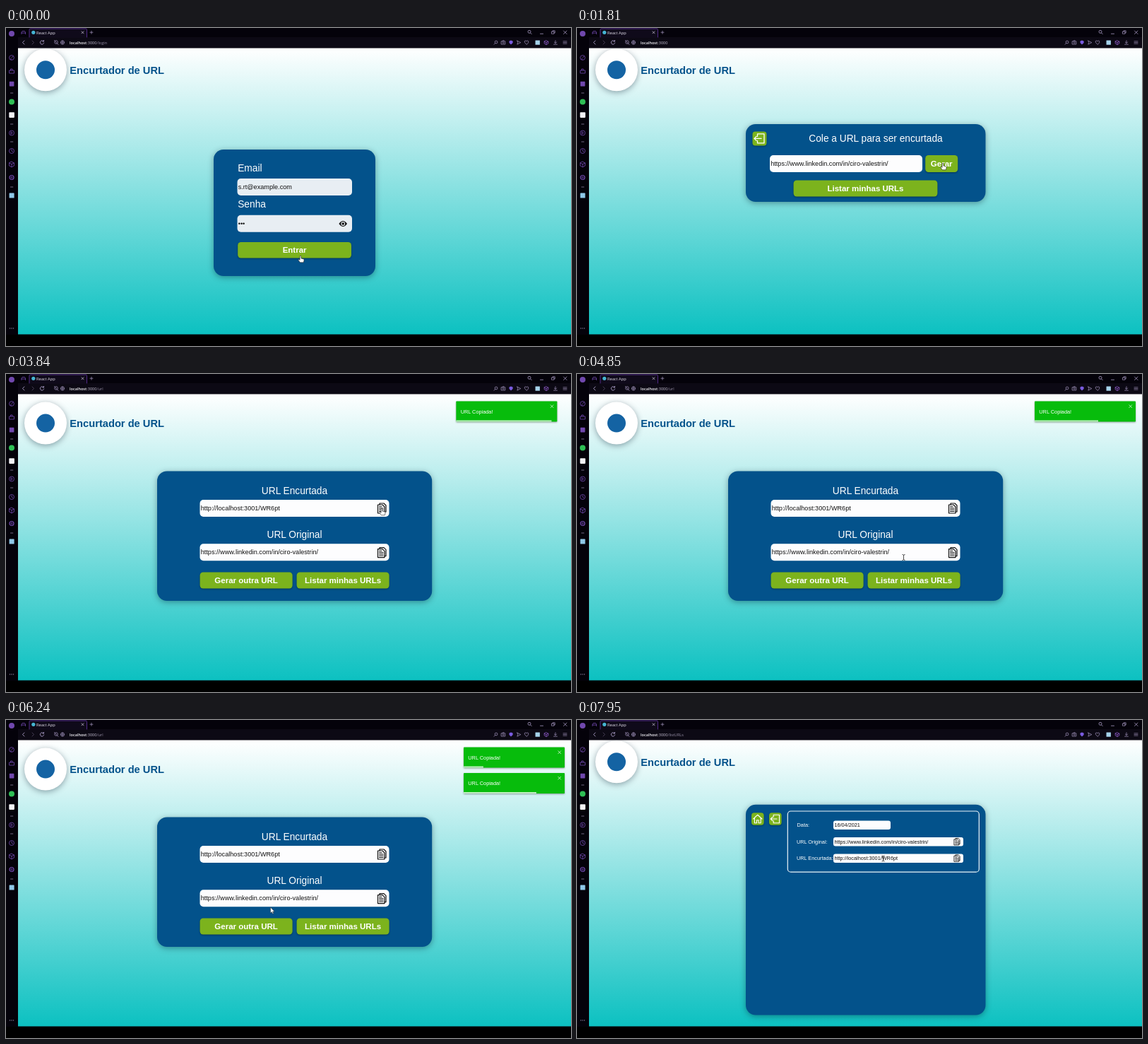
These frames come from a looping animation (800 by 450 pixels, 8000 ms). An HTML page:

```html
<!DOCTYPE html>
<html lang="pt-BR">
<head>
<meta charset="utf-8">
<title>Encurtador de URL</title>
<style>
  html, body { margin: 0; width: 100%; height: 100%; overflow: hidden; background: #000; }
  svg { display: block; width: 100vw; height: 100vh; }
  text { font-family: "Liberation Sans", Arial, sans-serif; white-space: pre; }
  .ui { font-family: "Open Sans", sans-serif; }
  .b { font-weight: bold; }
  .shadow { filter: drop-shadow(0 2px 4px rgba(0, 20, 40, .38)); }
  .lift { filter: drop-shadow(0 1px 1px rgba(0, 0, 0, .35)); }
  .line { fill: none; stroke-linecap: round; stroke-linejoin: round; }
</style>
</head>
<body>
<svg id="stage" viewBox="0 0 800 450"></svg>
<script>
const LOOP = 8000;
const BLUE = '#03528b', GREEN = '#7cb31d', PURPLE = '#7048ad', PALE = '#a99bc4';
const LONG_URL = 'https://www.linkedin.com/in/ciro-valestrin/';
const SHORT_URL = 'http://localhost:3001/WR6pt';

// Drawing helpers
const rect = (x, y, w, h, r, fill, extra = '') =>
  `<rect x="${x}" y="${y}" width="${w}" height="${h}" rx="${r}" fill="${fill}" ${extra}/>`;
const disc = (x, y, r, fill, extra = '') =>
  `<circle cx="${x}" cy="${y}" r="${r}" fill="${fill}" ${extra}/>`;
const ring = (x, y, r, color, w = .8) => disc(x, y, r, 'none', `stroke="${color}" stroke-width="${w}"`);
const line = (d, color, w = .8, extra = '') =>
  `<path class="line" d="${d}" stroke="${color}" stroke-width="${w}" ${extra}/>`;
const text = (x, y, size, fill, str, extra = '') =>
  `<text x="${x}" y="${y}" font-size="${size}" fill="${fill}" ${extra}>${str}</text>`;
const mid = 'text-anchor="middle"';
const group = (id, body) => `<g id="${id}">${body}</g>`;

const card = (x, y, w, h) => rect(x, y, w, h, 14, BLUE, 'class="shadow"');
const heading = (x, y, str) => text(x, y, 13.72, '#fff', str, mid);
const button = (x, y, w, h, str) =>
  rect(x, y, w, h, 4.5, GREEN, 'class="lift"') +
  text(x + w / 2, y + h / 2 + 4, 11.5, '#fff', str, `class="b" ${mid}`);
const field = (x, y, w, str, fill = '#fdfdfe') =>
  rect(x, y, w, 24, 5, fill) + text(x + 1.2, y + 14.8, 9.15, '#111', str);
const smallField = (y, w, str) =>
  rect(363, y, w, 12.5, 3, '#fdfdfe') + text(364.4, y + 8.8, 7.3, '#111', str);

const copyIcon = (x, y, s) => `<g transform="translate(${x} ${y}) scale(${s})">` +
  line('M-3 -5V-7H3L6 -4V5H4', '#111', 1.2) +
  line('M-5.5 -5H1L4 -2V7H-5.5Z', '#111', 1.2) +
  line('M-3.5 -2.2H0M-3.5 0H2M-3.5 2.2H2M-3.5 4.5H2', '#111', 1) + '</g>';
const iconBox = (x, y, s, d) =>
  rect(x - s / 2, y - s / 2, s, s, 4, GREEN, 'class="lift"') +
  `<g transform="translate(${x} ${y}) scale(${s / 20})">${line(d, '#fff', 1.3)}</g>`;
const EXIT = 'M-3 -3V-6.5H6.5V6.5H-3V3M2.5 0H-7.5M-4.5 -3L-7.5 0L-4.5 3';
const HOUSE = 'M-7 0L0 -6.5L7 0M-5 -1V6.5H-1.5V2H1.5V6.5H5V-1';

const sideBar = () =>
  disc(8, 8, 4, PURPLE) +
  ring(8, 42, 3.4, PURPLE) + line('M8 42L10 40M6 44H8', PURPLE) +
  line('M5 60H11.5V64H5ZM6.5 60V58H9V60', PURPLE) +
  rect(4.8, 75.8, 6.6, 6.6, .6, PURPLE) +
  disc(8, 104.5, 4, '#2fbf55') +
  rect(4.3, 119.3, 7.6, 7.6, .8, '#f2f2f5') +
  ring(8, 148.5, 3.5, PURPLE) + line('M7.2 147L9.4 148.5L7.2 150Z', PURPLE) +
  ring(8, 174, 3.5, PURPLE) + line('M8 172V174L9.6 175', PURPLE) +
  line('M8 189.2L11.4 191V195L8 196.8L4.6 195V191ZM4.6 191L8 192.8L11.4 191M8 192.8V196.8', PURPLE) +
  ring(8, 211.5, 3, PURPLE, 1.2) + ring(8, 211.5, 1.1, PURPLE) +
  rect(4.6, 233.6, 7, 7, .4, '#8fc9e8') +
  [92, 136, 161, 225].map(y => line(`M6.5 ${y}H9.8`, '#8c82a0', .8)).join('') +
  [5.5, 8, 10.5].map(x => disc(x, 425, .7, '#9187a6')).join('');

const topBar = () =>
  line('M22 8.5V6L23 4.5H26.5L27.5 6V8.5M22 7H27.5', PURPLE) +
  line('M33 13V2.5Q33 1 34.5 1H113Q114.5 1 114.5 2.5V13', '#5b2f96', .9) +
  disc(38.8, 6.3, 2.6, '#45b5d3') +
  text(43, 8.5, 5.7, '#e6e2ee', 'React App', 'class="ui"') +
  line('M107 4.8L110 7.8M110 4.8L107 7.8', '#d8d3e2', .7) +
  line('M119 6.2H123M121 4.2V8.2', PALE, .7) +
  ring(741, 5.3, 2, PALE) + line('M742.6 7L744.2 8.6', PALE) +
  line('M756.5 8.2H760.5', PALE) +
  line('M772.8 5H776V8.2H772.8ZM774 5V3.8H777.2V7H776', PALE, .7) +
  line('M789.5 4L794 8.5M794 4L789.5 8.5', PALE) +
  line('M26 18L23.4 20.5L26 23', PALE, .9) + line('M37 18L39.6 20.5L37 23', '#4d455c', .9) +
  line('M53 18.6A2.7 2.7 0 1 0 53.7 21M53.5 17.4V19H51.9', PALE, .9) +
  ring(71, 20, 2.3, PALE, .7) + line('M68.5 17.5L74 23.5', PALE, .7) +
  ring(80, 20.5, 2.6, PALE, .7) + line('M77.4 20.5H82.6M80 18Q78 20.5 80 23Q82 20.5 80 18', PALE, .5) +
  ring(694, 20, 1.9, PALE, .7) + line('M692.6 21.5L691 23.2', PALE, .7) +
  line('M701.5 18.8H706.8V23H701.5ZM703 18.8L703.5 17.8H705', PALE, .7) + ring(704.2, 20.8, 1, PALE, .6) +
  '<path d="M712.5 18.5L715 17.4L717.6 18.5V21L715 23.6L712.5 21Z" fill="#7a5ce0"/>' +
  line('M723.8 18L728.8 20.6L723.8 23.2L724.7 20.6Z', PALE, .7) +
  line('M737 23.2L734.3 20.4Q733.7 18 735.6 17.9Q736.6 18 737 19Q737.4 18 738.4 17.9Q740.3 18 739.7 20.4Z', PALE, .7) +
  rect(749.5, 17.4, 6.4, 6.4, .4, '#a5d2ea') +
  line('M765 17.8L767.8 19.2V22L765 23.5L762.2 22V19.2ZM762.2 19.2L765 20.6L767.8 19.2M765 20.6V23.5', '#9b62d8', .7) +
  line('M778 17.8V21.5M776.4 20L778 21.6L779.6 20M775.6 23.2H780.4', PALE, .7) +
  line('M789 18.8H794M789 20.5H794M789 22.2H794', PALE, .6);

const login =
  card(294, 172, 229, 179) +
  text(328.2, 203, 13.75, '#fff', 'Email') +
  field(327.5, 213, 162.5, 's.rt@example.com', '#e8eef3') +
  text(328.2, 254.2, 13.75, '#fff', 'Senha') +
  field(327.5, 264.8, 162.5, '•••', '#e8eef3') +
  '<path d="M471.4 277Q477.2 268.8 483 277Q477.2 285.2 471.4 277Z" fill="#111"/>' +
  disc(477.2, 277, 2.9, '#e8eef3') + disc(477.2, 277, 1.8, '#111') +
  button(328.2, 303, 160.8, 22.5, 'Entrar');

const home =
  card(239, 136, 339.5, 110) +
  iconBox(258.5, 156.4, 20, EXIT) +
  heading(423, 160.5, 'Cole a URL para ser encurtada') +
  field(273, 180, 216, '<tspan id="typed"></tspan>') +
  button(493.2, 180, 46, 24, 'Gerar') +
  button(306.6, 215.5, 203.8, 23, 'Listar minhas URLs');

const result =
  card(214, 137.5, 389.2, 183.5) +
  heading(408.5, 170, 'URL Encurtada') +
  field(274.5, 178, 268, SHORT_URL) + copyIcon(532, 190, 1) +
  heading(408.5, 232.3, 'URL Original') +
  field(274.5, 240.3, 268, LONG_URL) + copyIcon(532, 252.6, 1) +
  button(274.6, 280.5, 131, 23, 'Gerar outra URL') +
  button(411.6, 280.5, 131, 23, 'Listar minhas URLs');

const list =
  card(239, 119.8, 339.5, 297.7) +
  iconBox(255.8, 140, 17.6, HOUSE) + iconBox(280.8, 140, 17.6, EXIT) +
  group('row',
    rect(298.3, 129, 271, 86.2, 4.5, 'none', 'stroke="#eef4f8" stroke-width="1.2"') +
    text(311.6, 151.3, 7.3, '#fff', 'Data:') +
    text(311, 174.8, 7.3, '#fff', 'URL Original:') +
    text(311, 198.2, 7.3, '#fff', 'URL Encurtada:') +
    smallField(142.6, 81, '16/04/2021') +
    smallField(166, 184, LONG_URL) + copyIcon(538, 172.2, .68) +
    smallField(189.4, 184, SHORT_URL) + copyIcon(538, 195.6, .68));

const toast = (id, y) => group(id,
  rect(648, y, 143, 29, .8, '#07bc0c', 'class="lift"') +
  text(654.3, y + 17, 7.35, '#fff', 'URL Copiada!') +
  line(`M781.8 ${y + 5.3}L785.6 ${y + 9.1}M785.6 ${y + 5.3}L781.8 ${y + 9.1}`, '#d6f5d7', .8) +
  rect(648, y + 27, 143, 2, 0, '#fff', 'class="bar" opacity=".75"'));

const cursors =
  group('arrow', '<path d="M0 0V8.2L1.9 6.5L3.1 9.2L4.4 8.6L3.2 6H5.7Z" fill="#fff" stroke="#222" stroke-width=".5"/>') +
  group('beam', line('M-1.6 -4Q0 -4 0 -3V3Q0 4 -1.6 4M1.6 -4Q0 -4 0 -3M0 3Q0 4 1.6 4', '#222', .8)) +
  group('hand', '<path d="M-.9 .8Q0 -.5 .9 .8V4L4.6 5Q5.3 5.4 5 7L4.3 9.8H-.6L-3 6.6Q-3.2 5.2 -1.8 5.6L-.9 6.4Z" fill="#fff" stroke="#222" stroke-width=".6"/>');

const stage = document.getElementById('stage');
stage.innerHTML =
  `<defs><linearGradient id="sky" x2="0" y2="1"><stop stop-color="#fff"/><stop offset="1" stop-color="#0cc1c1"/></linearGradient></defs>` +
  rect(0, 0, 800, 450, 0, '#000') + rect(0, 0, 800, 434, 0, '#04020a') +
  rect(17, 13, 783, 15.5, 0, '#0c0914') + rect(33, 1, 81.5, 13, 1.5, '#0f0a1a') +
  rect(17, 28.5, 783, 405, 0, 'url(#sky)') + sideBar() + topBar() +
  text(90, 22.7, 5.55, '#f4f2f8', '<tspan font-weight="600">localhost</tspan><tspan fill="#c5bfd2">:3000</tspan><tspan id="path" fill="#9a92aa"></tspan>', 'class="ui"') +
  group('header',
    disc(56, 59.3, 30, '#fff', 'class="shadow"') + disc(56, 59.3, 13, '#1463a3') +
    text(90.3, 64.7, 14.68, BLUE, 'Encurtador de URL', 'class="b"')) +
  group('login', login) + group('home', home) + group('result', result) + group('list', list) +
  toast('toast1', 38.5) + toast('toast2', 75) + group('cursor', cursors);

const $ = id => document.getElementById(id);
const show = (id, on) => $(id).setAttribute('display', on ? 'inline' : 'none');
const move = (id, x, y) => $(id).setAttribute('transform', `translate(${x.toFixed(2)} ${y.toFixed(2)})`);

// Pages: name, start time, address path, header offset
const PAGES = [
  ['login', 0, '/login', 0], ['home', 380, '', 0],
  ['result', 2260, '/url', 10.3], ['list', 6950, '/listURLs', 0]
];
const PASTE = 1200, ROW = 7380, TOAST_LIFE = 3200;

// Pointer stops: time, x, y
const STOPS = [
  [0, 417, 322], [400, 417, 322], [950, 385, 192], [1250, 385, 192], [1750, 518, 191],
  [2300, 518, 191], [2610, 520, 191], [2950, 532, 190], [3850, 532, 190], [4650, 464, 258],
  [4850, 462.5, 259.5], [5200, 532, 253], [5550, 532, 253], [6240, 374.5, 265],
  [6700, 466, 290], [7400, 466, 290], [7950, 433.5, 196], [8000, 433.5, 196]
];

// Hot areas per page: x1, y1, x2, y2
const HAND = {
  login: [[328, 303, 489, 326], [471, 271, 483, 283]],
  home: [[493, 180, 539, 204], [306, 215, 511, 239], [248, 146, 269, 167]],
  result: [[526, 182, 539, 198], [526, 245, 539, 260], [274, 280, 406, 304], [411, 280, 543, 304]],
  list: []
};
const BEAM = {
  login: [[327, 213, 490, 237], [327, 265, 490, 289]],
  home: [[273, 180, 489, 204]],
  result: [[274, 178, 543, 202], [274, 240, 543, 264.5]],
  list: [[363, 142, 444, 155], [363, 166, 547, 179], [363, 189, 547, 202]]
};
const inside = (areas, x, y) => areas.some(([a, b, c, d]) => x >= a && x <= c && y >= b && y <= d);

function pointer(t) {
  const i = STOPS.findIndex(s => s[0] > t);
  const [t0, x0, y0] = STOPS[i - 1], [t1, x1, y1] = STOPS[i];
  const u = (t - t0) / (t1 - t0), k = u * u * (3 - 2 * u);
  return [x0 + (x1 - x0) * k, y0 + (y1 - y0) * k];
}

// Slides in from the right with a damped bounce, then leaves the same way
function slide(age) {
  const out = age - TOAST_LIFE;
  if (out > 0) return out < 70 ? -out / 9 : -8 + (out - 70) * 1.4;
  const u = Math.min(1, age / 480);
  return 170 * (1 - u) ** 2 * Math.exp(-5 * u) * Math.cos(u * 8);
}

function drawToast(id, age, page) {
  const on = page === 'result' && age >= 0;
  show(id, on);
  if (!on) return;
  move(id, slide(age), 0);
  $(id).querySelector('.bar').setAttribute('width', 143 * Math.max(0, 1 - age / TOAST_LIFE));
}

function draw(t) {
  const [page, , path, shift] = PAGES.filter(p => p[1] <= t).pop();
  PAGES.forEach(([id]) => show(id, id === page));
  $('path').textContent = path;
  move('header', 0, shift);
  $('typed').textContent = t >= PASTE ? LONG_URL : '';
  show('row', t >= ROW);
  drawToast('toast1', t - 3665, page);
  drawToast('toast2', t - 5344, page);

  const [x, y] = pointer(t);
  const hand = inside(HAND[page], x, y);
  const beam = !hand && inside(BEAM[page], x, y) && (page !== 'list' || t >= ROW);
  show('hand', hand);
  show('beam', beam);
  show('arrow', !hand && !beam);
  move('cursor', x, y);
}

const start = performance.now();
function tick() {
  draw((performance.now() - start) % LOOP);
  requestAnimationFrame(tick);
}
tick();
</script>
</body>
</html>
```
